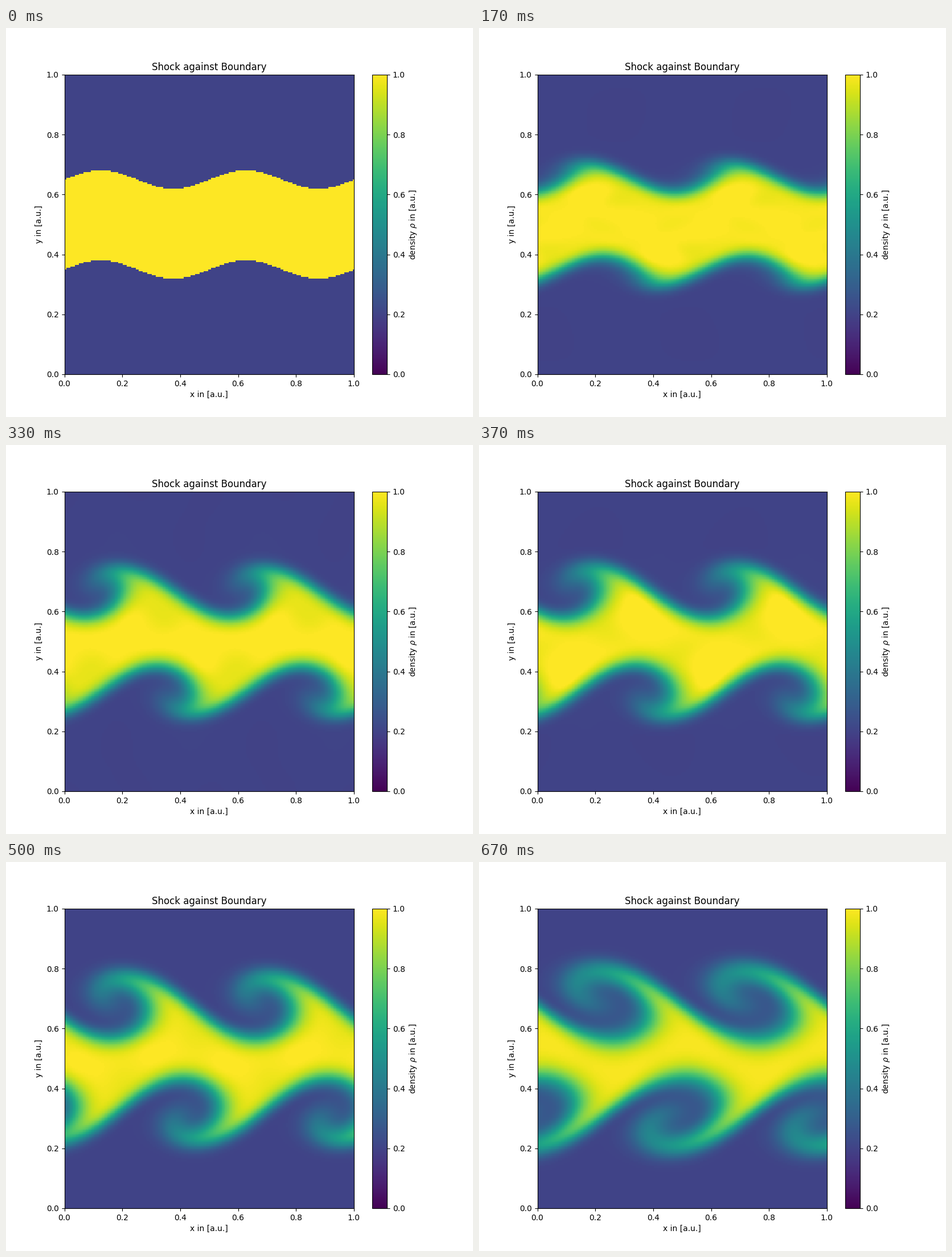
A matplotlib script that plays this animation: 820x683 px, repeating every 0.7 s.

```python
import numpy as np
import matplotlib.pyplot as plt
from matplotlib.animation import FuncAnimation

# Shear flow of a dense jet in a thin gas, solved on one wavelength of the
# upper half; the lower half is its mirror image shifted by half a wavelength.
N = 200
M = N // 2
H = 1 / N
GAMMA = 1.4
PRESSURE = 2.5
SPEED = 0.5
DIFFUSION = 1.15e-3
STATES = 21
STEPS = 50
DT = 0.06 / STEPS
FLIP = np.array([1, 1, -1, 1]).reshape(4, 1, 1)

x = (np.arange(M) + 0.5) * H
y = 0.5 + (np.arange(M) + 0.5) * H
X, Y = np.meshgrid(x, y)
edge = 0.65 + 0.03 * np.sin(4 * np.pi * X)


def initial_state():
    jet = 0.5 * (1 - np.tanh((Y - edge) / 0.008))
    rho = 0.2 + 0.8 * jet
    mx = SPEED * (jet - 0.2 * (1 - jet))
    energy = PRESSURE / (GAMMA - 1) + 0.5 * mx**2 / rho
    return np.stack([rho, mx, np.zeros_like(rho), energy])


def pad(q):
    mirror = np.roll(q, M // 2, axis=2) * FLIP
    q = np.concatenate([mirror[:, 1::-1], q, mirror[:, :-3:-1]], axis=1)
    return np.concatenate([q[:, :, -2:], q, q[:, :, :2]], axis=2)


def slope_x(f):
    f = f[:, 2:-2]
    return (8 * (f[:, :, 3:-1] - f[:, :, 1:-3])
            - (f[:, :, 4:] - f[:, :, :-4])) / (12 * H)


def slope_y(f):
    f = f[:, :, 2:-2]
    return (8 * (f[:, 3:-1] - f[:, 1:-3])
            - (f[:, 4:] - f[:, :-4])) / (12 * H)


def rate(q):
    big = pad(q)
    rho, mx, my, energy = big
    u, v = mx / rho, my / rho
    p = (GAMMA - 1) * (energy - 0.5 * (mx * u + my * v))
    flux_x = np.stack([mx, mx * u + p, my * u, (energy + p) * u])
    flux_y = np.stack([my, mx * v, my * v + p, (energy + p) * v])
    spread = (big[:, 2:-2, 3:-1] + big[:, 2:-2, 1:-3]
              + big[:, 3:-1, 2:-2] + big[:, 1:-3, 2:-2] - 4 * q) / H**2
    return DIFFUSION * spread - slope_x(flux_x) - slope_y(flux_y)


def advance(q):
    a = rate(q)
    b = rate(q + DT / 2 * a)
    c = rate(q + DT / 2 * b)
    d = rate(q + DT * c)
    return q + DT / 6 * (a + 2 * b + 2 * c + d)


def whole(upper):
    lower = np.roll(upper, M // 2, axis=1)[::-1]
    return np.tile(np.vstack([lower, upper]), (1, 2))


def simulate():
    fields = [whole(np.where(Y < edge, 1.0, 0.2))]
    q = initial_state()
    for _ in range(STATES - 1):
        for _ in range(STEPS):
            q = advance(q)
        fields.append(whole(q[0]))
    return fields


fields = simulate()

# The small excess keeps rounding from losing a pixel.
fig, ax = plt.subplots(figsize=(8.2001, 6.8301), dpi=100)
image = ax.imshow(fields[0], origin="lower", extent=(0, 1, 0, 1),
                  aspect="auto", interpolation="nearest",
                  cmap="viridis", vmin=0, vmax=1)
ax.set_title("Shock against Boundary")
ax.set_xlabel("x in [a.u.]")
ax.set_ylabel("y in [a.u.]")
fig.colorbar(image, ax=ax, label=r"density $\rho$ in [a.u.]")


def update(tick):
    # 30 pictures per second on a clock of 10 ms
    image.set_data(fields[(3 * tick + 1) // 10])
    return [image]


anim = FuncAnimation(fig, update, frames=70, interval=10,
                     repeat=True, repeat_delay=0, blit=False)
plt.show()
```
